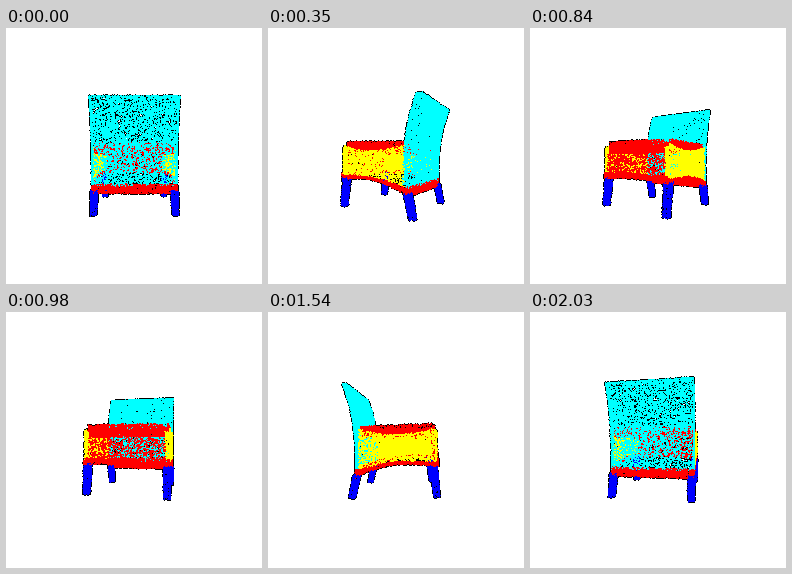
Write a matplotlib script that moves like this. It is 256x256 px and loops after 2100 ms.

```python
import numpy as np
import matplotlib.pyplot as plt
from matplotlib.animation import FuncAnimation

SIZE, FRAMES, STEP = 256, 30, 70
DIST = 210  # camera distance; one unit is one pixel at the centre
CORE, RIM = 0.8, 1.4  # ball radii in pixels
CYAN, RED, YELLOW, BLUE = (0, 255, 255), (255, 0, 0), (255, 255, 0), (0, 0, 255)

rng = np.random.default_rng(7)
clouds = []


def add(x, y, z, color):
    pts = np.stack(np.broadcast_arrays(x, y, z), axis=1).astype(float)
    pts += rng.normal(0, 0.15, pts.shape)
    clouds.append((pts, np.tile(color, (len(pts), 1))))


def uni(a, b, n):
    return rng.uniform(a, b, n)


def mix(a, b, t):
    return a + (b - a) * t


def rear(y):
    return 31 + 12 * (np.clip(y + 25, 0, 74) / 74) ** 2.7


def back():
    x, y = uni(-36.3, 36.3, 5000), uni(-25, 48.3, 5000)
    # the cover is thinner where the arms meet it
    thin = (np.abs(x) > 26) & (np.abs(y + 5) < 13) & (rng.random(x.size) < 0.5)
    x, y = x[~thin], y[~thin]
    add(x, y, rear(y), CYAN)
    y = uni(8, 48.3, 1200)
    add(uni(-36.3, 36.3, y.size), y, rear(y) - 4, CYAN)
    add(uni(-36.3, 36.3, 200), 48.3, uni(39, 43, 200), CYAN)
    for side in (-36.3, 36.3):
        y = uni(-24, 48.3, 600)
        add(side, y, rear(y) - uni(0, 4.5, y.size), CYAN)


def cushion():
    x = uni(-34.5, 34.5, 1500)
    top = 13.7 - 4 * (np.abs(x) / 34.5) ** 8
    add(x, mix(3, top, uni(0, 1, x.size)), -35.5 + 3 * (np.abs(x) / 34.5) ** 6, RED)
    for side in (-34.5, 34.5):
        z = uni(-33, 27, 1100)
        top = mix(13.7, 12, (z + 33) / 60)
        add(side, mix(3, top, uni(0, 1, z.size)), z, RED)
    add(uni(-34, 34, 600), uni(4, 12, 600), 26, RED)


def panels():
    for side in (-36.5, 36.5):
        z = uni(-36, 28, 1900)
        top = 5 + 4.5 * ((z + 3) / 30) ** 2
        low = -17 - 7 * np.clip((z + 8) / 36, 0, 1) ** 1.5
        add(side, mix(low, np.minimum(top, 10), uni(0, 1, z.size)), z, YELLOW)
        add(side * uni(0.9, 1, 220), uni(-16, 7, 220), -36.5, YELLOW)
    y = uni(-16, 2, 800)
    add(uni(-33, 33, y.size), y, -36.5 + y / 12, RED)


def rails():
    add(uni(-36.5, 36.5, 1400), uni(-31.5, -23.5, 1400), 31, RED)
    x = uni(-36.5, 36.5, 600)
    add(x, mix(-19 - 2 * (x / 37) ** 2, -15, uni(0, 1, x.size)), -38, RED)
    for side in (-36.3, 36.3):
        z = uni(-38, 31, 700)
        t = np.clip((z + 8) / 39, 0, 1) ** 1.5
        front = np.clip((-8 - z) / 29, 0, 1) ** 2
        add(side, mix(-17 - 8 * t, -19.5 - 11 * t - 1.5 * front, uni(0, 1, z.size)), z, RED)


def leg(x, top, foot, z_top, z_foot, n=520):
    t = uni(0, 1, n)
    half = mix(2.6, 2.1, t)
    u, v = uni(-1, 1, n), rng.choice([-1, 1], n)
    flip = rng.random(n) < 0.5
    dx, dz = np.where(flip, u, v), np.where(flip, v, u)
    add(x + half * dx, mix(top, foot, t), mix(z_top, z_foot, t) + half * dz, BLUE)


back()
cushion()
panels()
rails()
for side in (-34.3, 34.3):
    leg(side, -29, -49, 30, 34.5)
    leg(side, -20, -46.5, -34, -37)

points = np.concatenate([c[0] for c in clouds])
colors = np.concatenate([c[1] for c in clouds]).astype(np.uint8)


def render(i):
    a = 2 * np.pi * i / FRAMES
    x, y, z = points.T
    near = z * np.cos(a) - x * np.sin(a)
    scale = DIST / (DIST - near)
    px = SIZE / 2 + scale * (x * np.cos(a) + z * np.sin(a))
    py = SIZE / 2 - scale * y
    col, row = np.rint(px).astype(int), np.rint(py).astype(int)

    img = np.full((SIZE, SIZE, 3), 255, np.uint8)
    cores = []
    for dy in (-1, 0, 1):
        for dx in (-1, 0, 1):
            c, r = col + dx, row + dy
            gap = np.hypot(c - px, r - py)
            rim, core = gap < RIM, np.flatnonzero(gap < CORE)
            img[r[rim], c[rim]] = 0
            cores.append((r[core], c[core], core))

    # black rims stay behind all colour, which is painted far to near
    r, c, k = (np.concatenate(part) for part in zip(*cores))
    order = np.argsort(near[k], kind="stable")
    img[r[order], c[order]] = colors[k[order]]
    return img


fig = plt.figure(figsize=(2.56, 2.56), dpi=100, facecolor="white")
ax = fig.add_axes([0, 0, 1, 1])
ax.axis("off")
view = ax.imshow(render(0), interpolation="nearest", aspect="auto")


def update(i):
    view.set_data(render(i))
    return (view,)


anim = FuncAnimation(fig, update, frames=FRAMES, interval=STEP, repeat=True, repeat_delay=0)
plt.show()
```
